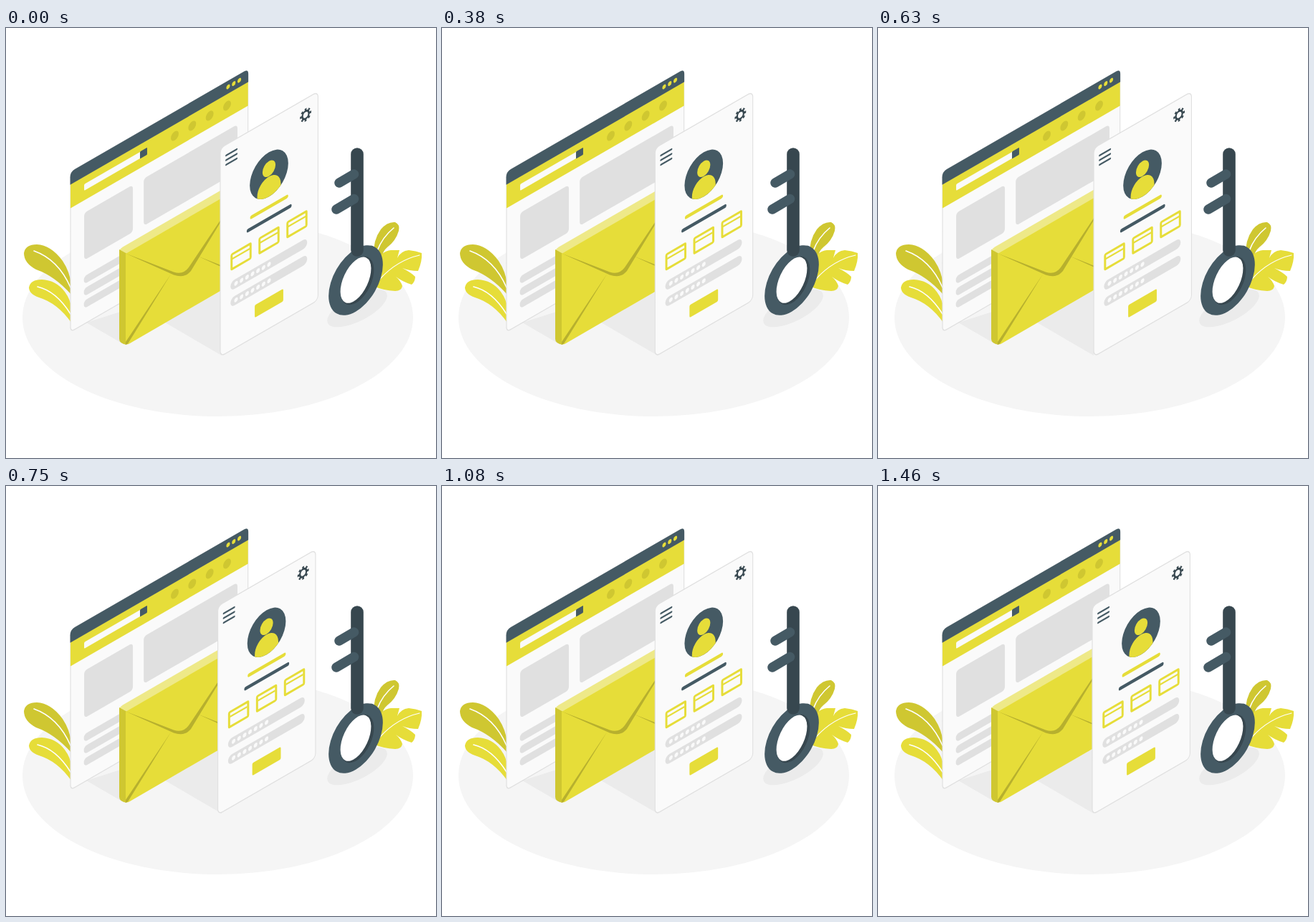
Write an HTML page that moves like this. It is 600 px wide and 600 px high and loops after 1.5 s.

```html
<!DOCTYPE html>
<html lang="en">
<head>
<meta charset="utf-8">
<title>Account access</title>
<style>
  html, body { margin: 0; height: 100%; overflow: hidden; background: #fff; }
  svg { display: block; width: 100%; height: 100%; }
  .y { fill: #e6dd39 } .o { fill: #cfc731 } .b { fill: #b7b02e }
  .d { fill: #455a64 } .k { fill: #37474f } .g { fill: #e0e0e0 }
  .w { fill: #fafafa } .s { fill: #ebebeb }
  .line { fill: none; stroke-linecap: round }
  .sheet { fill: #fafafa; stroke: #e0e0e0; stroke-width: 1.3 }
</style>
</head>
<body>
<svg viewBox="0 0 600 600">
  <defs>
    <g id="card">
      <rect x="1.7" y="1.7" width="30.6" height="20.6" rx="1" fill="none" stroke="#e6dd39" stroke-width="3.4"/>
      <path d="M3 8.2H31" stroke="#e6dd39" stroke-width="2.6"/>
    </g>
    <g id="field" class="line">
      <path d="M23 0H133.5" stroke="#e0e0e0" stroke-width="13"/>
      <path d="M25.4 0H79" stroke="#fafafa" stroke-width="6" stroke-dasharray="0 8.85"/>
    </g>
  </defs>

  <ellipse class="floor" cx="295.5" cy="404" rx="272.5" ry="138" fill="#f5f5f5"/>
  <path class="s" d="M112 411L162 440L210 380ZM222 411L301 457V366Z"/>
  <ellipse class="s" cx="490" cy="391" rx="46" ry="18" transform="rotate(-27 490 391)"/>

  <g id="plants">
    <path class="o" d="M91 372Q68 346 42 337Q25 328 25 314Q27 302 43 302Q63 303 79 325Q89 340 91 358Z"/>
    <path class="y" d="M91 411Q72 384 46 376Q32 371 32 362Q34 351 50 351Q70 352 82 368Q90 379 91 390Z"/>
    <path class="o" d="M513 318Q512 296 523 281Q532 270 543 271Q550 274 548 283Q544 297 532 306Q526 311 524 320Z"/>
    <path class="y" d="M518 326Q524 311 537 310L549 310L546 321Q551 311 562 310Q572 311 580 314Q581 325 575 339Q563 339 553 335Q565 341 571 347Q571 354 566 358Q553 354 544 347Q551 353 553 360Q552 367 543 367Q526 366 515 361Z"/>
    <g class="line" stroke="#fff" stroke-width="1.6">
      <path d="M39 311Q73 323 90 362"/>
      <path d="M44 361Q70 367 90 399"/>
      <path d="M541 279Q525 292 518 311"/>
      <path d="M577 317Q546 324 522 350" stroke-width="1.2"/>
    </g>
  </g>

  <g id="browser" transform="matrix(.866 -.5 0 1 90 424)">
    <rect class="sheet" y="-223" width="286" height="223" rx="6"/>
    <path class="y" d="M0-206H286V-172.5H0Z"/>
    <path class="d" d="M-.5-205.5V-216Q-.5-223.5 7-223.5H280Q286.5-223.5 286.5-217V-205.5Z"/>
    <g class="line" stroke="#e6dd39" stroke-width="6"><path d="M254-215H273" stroke-dasharray="0 9"/></g>
    <g class="line" stroke="#cfc731" stroke-width="12.6"><path d="M168-189.5H253" stroke-dasharray="0 28.1"/></g>
    <rect class="w" x="22" y="-195" width="92" height="9" rx="1.5"/>
    <rect class="d" x="112" y="-195.5" width="11.5" height="10" rx="1"/>
    <rect class="g" x="22" y="-155" width="78.5" height="66" rx="5"/>
    <rect class="g" x="118" y="-155" width="151" height="66" rx="5"/>
    <path class="line" stroke="#e0e0e0" stroke-width="11" d="M27-61H95M27-44H95M27-27H95"/>
  </g>

  <g id="envelope">
    <path fill="#eee988" d="M158 311Q159 308 163 305.5L330 209V221L167 316Z"/>
    <path class="o" d="M158 309L168 314.5V442Q158 440 158 434Z"/>
    <path class="y" d="M167 315L330 220.5V349L172 440.5Q167 443 167 439Z"/>
    <path class="b" d="M167 314.5L234 340.5Q247 345 255 334L320 237L258 339Q249 350 234 344.5Z"/>
    <path class="b" d="M167 438L231 342L170 440.5L167 442Z"/>
    <path class="b" d="M268 318.5L315 337V340Z"/>
  </g>

  <g id="panel">
    <g transform="matrix(.866 -.5 0 1 299 458.5)">
      <rect class="sheet" y="-291" width="157.5" height="291" rx="7"/>
      <path class="line" stroke="#455a64" stroke-width="2.6" d="M9.5-276H26.5M9.5-269.5H26.5M9.5-263H26.5"/>
      <g transform="translate(137.5 -268.5)" fill="none" stroke="#37474f">
        <circle r="5.3" stroke-width="2.8"/>
        <circle r="7.6" stroke-width="3" pathLength="16" stroke-dasharray="1" stroke-dashoffset=".5"/>
      </g>
      <circle class="d" cx="78.5" cy="-215" r="31"/>
      <circle class="y" cx="78.5" cy="-223" r="10.5"/>
      <path class="y" d="M59.5-190.5V-193A19 19 0 0 1 97.5-193V-190.5A31 31 0 0 1 59.5-190.5Z"/>
      <path class="line" stroke="#e6dd39" stroke-width="5" d="M50.5-169.5H107"/>
      <path class="line" stroke="#455a64" stroke-width="5" d="M45-153.5H112.5"/>
      <use href="#card" x="16.5" y="-135"/>
      <use href="#card" x="61.5" y="-135"/>
      <use href="#card" x="106.5" y="-135"/>
      <use href="#field" y="-89.5"/>
      <use href="#field" y="-66.5"/>
      <rect class="y" x="55.5" y="-44" width="46" height="17.5" rx="2"/>
    </g>
  </g>

  <g id="key">
    <circle class="d" r="43.7" transform="matrix(.866 -.5 0 1 488 352)"/>
    <ellipse class="k" rx="19.5" ry="36" transform="translate(490 352.5) rotate(25)"/>
    <ellipse fill="#fff" rx="17.3" ry="34.5" transform="translate(488 351.7) rotate(25)"/>
    <path class="line" stroke="#37474f" stroke-width="17.6" d="M490 176V310"/>
    <path class="line" stroke="#455a64" stroke-width="13.5" d="M465 216L485.500 204M461 253L485.500 238.500"/>
  </g>
</svg>
<script>
  const LOOP = 1500, STEPS = 36, SCALE = 1.2;
  const shake = [0, -1, 2, -4, 4, -4, 4, -4, 2, -1, 0];
  const panel = document.getElementById('panel');

  // Linear interpolation between evenly spaced shake offsets
  function offset(p) {
    const i = Math.min(Math.floor(p * 10), 9);
    return SCALE * (shake[i] + (shake[i + 1] - shake[i]) * (p * 10 - i));
  }

  function draw(now) {
    // 24 drawings per second; the last one is back at rest
    const step = Math.floor((now % LOOP + 4) * STEPS / LOOP) % STEPS;
    panel.setAttribute('transform', `translate(${offset(step / (STEPS - 1))} 0)`);
    requestAnimationFrame(draw);
  }
  draw(performance.now());
</script>
</body>
</html>
```
